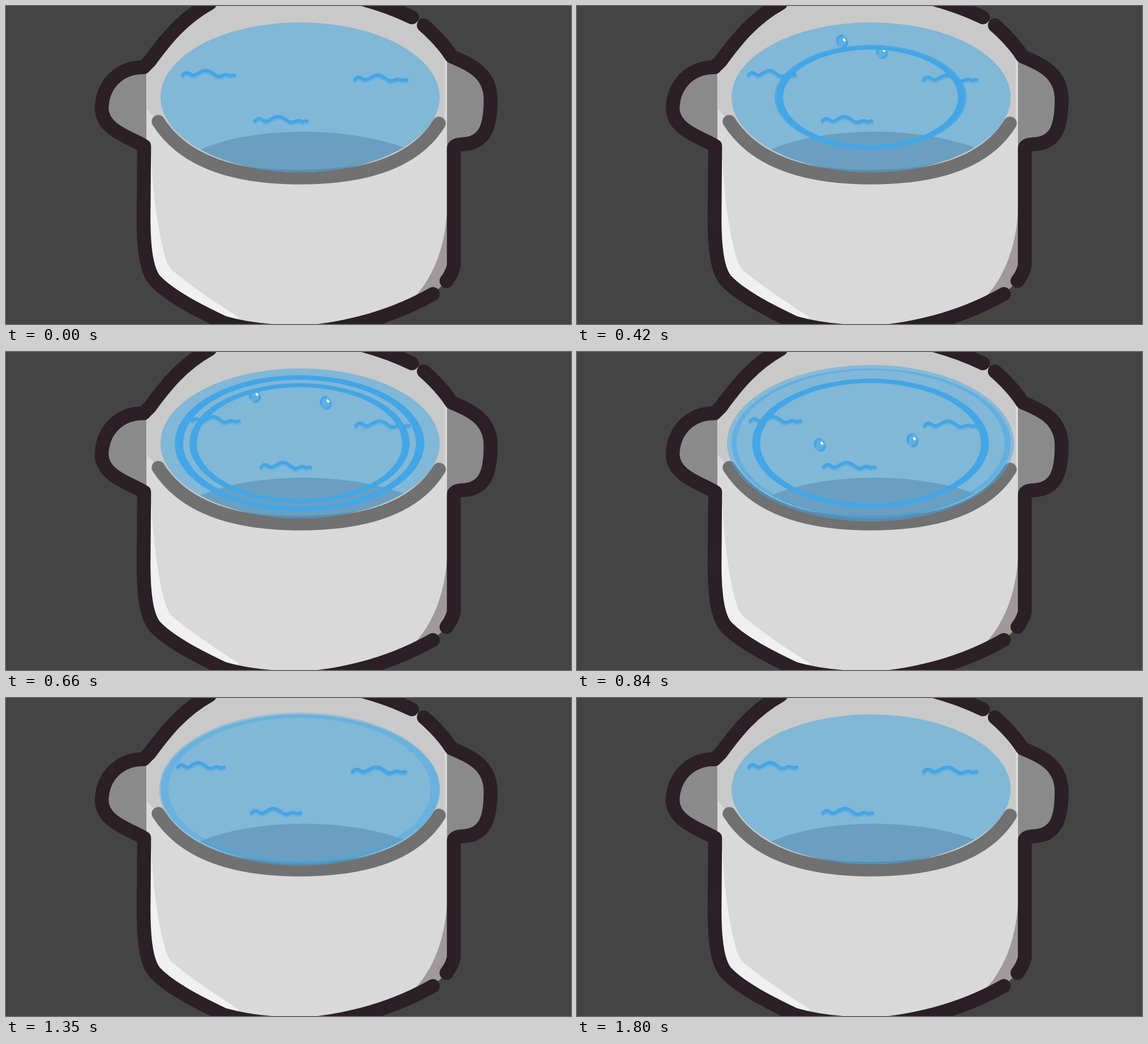
An HTML page that plays this animation: 998 px wide and 561 px high, repeating every 1830 ms.

```html
<!DOCTYPE html>
<html lang="en">
<head>
<meta charset="utf-8">
<title>Pot of water</title>
<style>
  html, body { margin: 0; width: 100%; height: 100%; overflow: hidden; background: #444; }
  svg { display: block; width: 100vw; height: 100vh; }
  .line { fill: none; stroke-linecap: round; stroke-linejoin: round; }
</style>
</head>
<body>
<svg viewBox="0 0 998 561">
  <defs>
    <clipPath id="pool"><ellipse cx="519.5" cy="161" rx="246.5" ry="132"/></clipPath>
    <path id="squiggle" d="M-41 3C-36-4-30-1-26 2C-18 7-12-5 0-5C12-5 16 7 25 5C31 4 34 0 40 3C45 6 47 2 51 3"/>
    <g id="wave" class="line" stroke="#43a6e6" stroke-width="5.8">
      <use href="#squiggle" y="3" opacity=".4"/>
      <use href="#squiggle"/>
    </g>
    <g id="drop">
      <g transform="rotate(-15)">
        <ellipse rx="10.5" ry="12.5" fill="#62afdd"/>
        <path class="line" stroke="#43a6e6" stroke-width="4" d="M3-10C-4-12-9-6-8.500 1M8 3C7 8 3 11-2 10"/>
      </g>
      <ellipse cx="3.500" cy="-3" rx="2" ry="3" fill="#fff" transform="rotate(-35 3.500 -3)"/>
    </g>
  </defs>

  <!-- handles -->
  <path fill="#8a8a8a" d="M250 108C200 108 170 138 169 181C170 218 215 230 250 247ZM778 85C820 103 856 118 856 165C856 210 848 243 778 246Z"/>

  <!-- body, inner wall, highlight, shadow -->
  <path fill="#d9d9d9" d="M248 105C275 70 305 30 360-5L630-12L717 20L738 34C762 55 775 72 779 92V250H791V458L778 485L754 508C660 565 558 575 519 575S430 572 385 559C345 540 288 512 262 483C248 465 243 430 243 375L244 247H248Z"/>
  <path fill="#c9c9c9" d="M249 105C275 70 305 30 360-5L630-12L717 20L738 34C758 52 769 70 775 95V200L765 207C725 272 640 303 519 303C398 303 312 271 269 204L249 182Z"/>
  <path fill="#f0f0f0" d="M257 270C260 340 269 395 279 435Q283 453 292 465C325 493 370 523 412 550L385 559L262 483L250 440V270Z"/>
  <path fill="#9f9999" d="M780 346C778 415 760 470 724 511L754 508L766 497L778 485L791 458V346Z"/>

  <!-- outline -->
  <g class="line" stroke="#2b2025" stroke-width="24.500">
    <path d="M360-5C311 22 281 60 254 97L243 108C200 108 170 138 169 181C170 218 215 230 244 247L243 375C243 430 248 465 262 483C288 512 345 540 385 559C430 572 480 575 519 575S660 562 754 508"/>
    <path d="M630-12C660-4 692 8 717 20"/>
    <path d="M738 34C762 55 775 70 787 89C820 103 856 118 856 165C856 210 848 243 805 244Q791 245 791 252V458Q788 472 778 485"/>
  </g>

  <!-- rim and water -->
  <path class="line" stroke="#717171" stroke-width="23.500" d="M269 204C312 271 398 303 519 303C640 303 725 272 765 207"/>
  <ellipse cx="519.5" cy="161" rx="246.5" ry="132" fill="#81b7d7"/>
  <g clip-path="url(#pool)">
    <path fill="#6a9fc1" d="M343 253C440 212 600 212 703 250V300H343Z"/>
    <path fill="#5490b5" d="M380 270C440 296 600 296 665 267V300H380Z"/>
  </g>
  <g id="waves"></g>
  <g id="drops"></g>
  <g id="rings" fill="none" stroke="#43a6e6"></g>
</svg>
<script>
const LOOP = 1830, STEP = 30;

const clamp = u => Math.min(1, Math.max(0, u));
const ramp = (t, from, to) => clamp((t - from) / (to - from));
const smooth = u => u * u * (3 - 2 * u);

// Fade in from a to b, out from c to d
const fade = (t, [a, b, c, d]) => ramp(t, a, b) - ramp(t, c, d);

// Parabola through values a, b, c at 300, 540 and 840 ms
function arc([a, b, c], t) {
  const s = (b - a) / 240;
  return a + s * (t - 300) + ((c - b) / 300 - s) / 540 * (t - 300) * (t - 540);
}

// Start of each quick swing between the right (1) and left (-1) ends
const swings = [228, 499, 764, 970, 1230, 1470, 1705];
const SWING = 110;

function sway(t) {
  let p = smooth(ramp(t, 0, SWING));
  swings.forEach((s, i) => p += (i % 2 ? 2 : -2) * smooth(ramp(t, s, s + SWING)));
  return p;
}

function add(parent, tag, attrs) {
  const el = document.createElementNS("http://www.w3.org/2000/svg", tag);
  for (const k in attrs) el.setAttribute(k, attrs[k]);
  return document.getElementById(parent).appendChild(el);
}

const waves = [
  { x: 353, y: 119, shift: 13, squash: -.1 },
  { x: 657, y: 127, shift: 3, squash: .02 },
  { x: 481, y: 200, shift: 8.5, squash: -.05 }
].map(w => ({ ...w, el: add("waves", "use", { href: "#wave" }) }));

const drops = [
  { x: [489, 452, 429], y: [98, 56, 164] },
  { x: [530, 550.5, 592.5], y: [111, 74, 156] }
].map(d => ({ ...d, el: add("drops", "use", { href: "#drop" }) }));

// The outer ring slows evenly; the inner one bursts out, then drifts
const rings = [
  { size: t => 245 * Math.min(1, (t / 840) ** .58), life: [230, 470, 660, 1010] },
  { size: t => Math.min(241, 140 + .074 * t - 40 * Math.exp((300 - t) / 93)), life: [170, 230, 1140, 1475] }
].map(r => ({ ...r, el: add("rings", "ellipse", { rx: 1, ry: 1, "stroke-width": .069 }) }));

function place(el, transform, opacity = 1) {
  el.setAttribute("transform", transform);
  el.setAttribute("opacity", opacity);
}

function draw(t) {
  const p = sway(t);
  for (const w of waves)
    place(w.el, `translate(${w.x + w.shift * p} ${w.y}) scale(${1 + w.squash * p * p} 1)`);
  for (const d of drops)
    place(d.el, `translate(${arc(d.x, t)} ${arc(d.y, t)})`, fade(t, [170, 210, 850, 920]));
  for (const r of rings) {
    const s = Math.max(0, r.size(t));
    place(r.el, `translate(518.5 161) scale(${s} ${s * .545})`, fade(t, r.life));
  }
}

const start = performance.now();
function tick() {
  const t = (performance.now() - start) % LOOP;
  draw(Math.floor(t / STEP) * STEP);
  requestAnimationFrame(tick);
}
tick();
</script>
</body>
</html>
```
